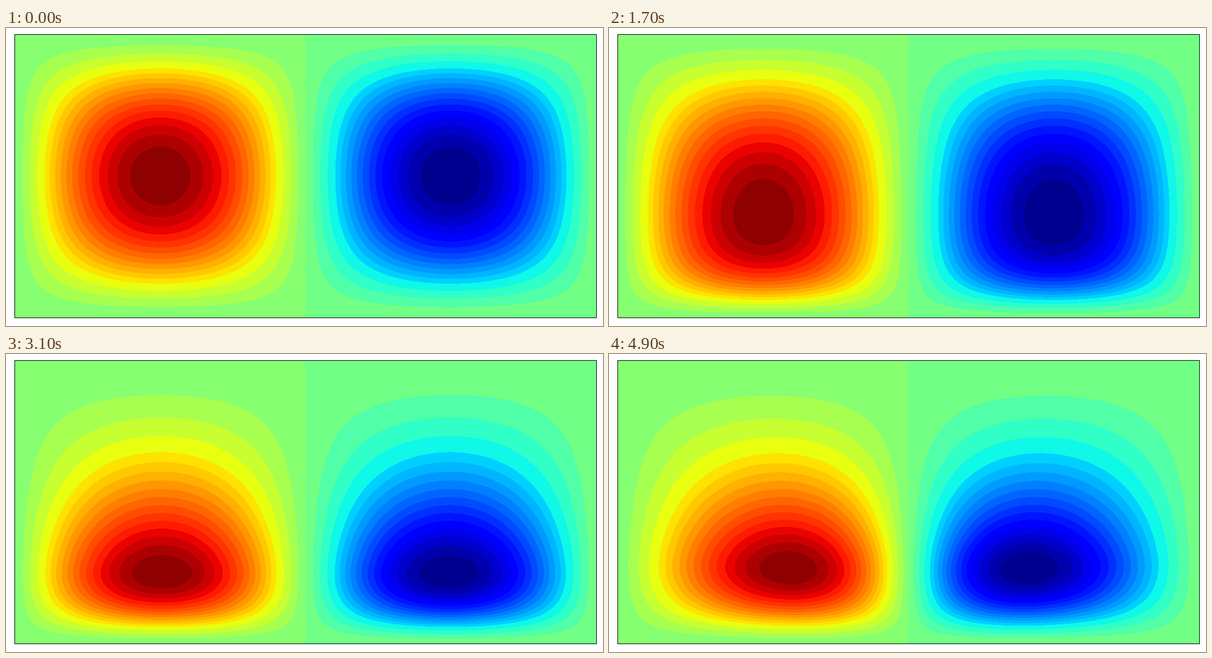
An HTML page with a canvas for the animation above (5 s loop, 1058x529 px).

```html
<!DOCTYPE html>
<html lang="en">
<head>
<meta charset="utf-8">
<title>Double gyre</title>
<style>
  html, body { margin: 0; width: 100%; height: 100%; overflow: hidden; background: #fff; }
  canvas { display: block; }
</style>
</head>
<body>
<canvas id="stage" width="1058" height="529"></canvas>
<script>
const ctx = document.getElementById('stage').getContext('2d');
const LEFT = 16, TOP = 12, WIDTH = 1030, HEIGHT = 502;
const CELL = WIDTH / 2, HALF = CELL / 2;
const CEILING = TOP - .5, FLOOR = TOP + HEIGHT + .5;
const STEP = 100, STEPS = 50;
const BANDS = 19, TABLE = 2000;

const ramp = (x, from, to) => Math.min(1, Math.max(0, (x - from) / (to - from)));

function ease(x, from, to) {
  const u = ramp(x, from, to);
  return u * u * (3 - 2 * u);
}

// Contour levels: the outer four bands are half again as wide as the rest
const levels = Array.from({ length: 17 }, (_, k) => (k < 4 ? 1.5 * k : k + 2) / BANDS);

function jet(u) {
  return [
    ramp(u, .35, .66) - .5 * ramp(u, .89, 1),
    ramp(u, .125, .375) - ramp(u, .64, .91),
    .5 + .5 * ramp(u, 0, .11) - ramp(u, .34, .65)
  ].map(c => Math.round(255 * c));
}

function bandColor(value, sign) {
  const level = levels.findLast(edge => edge <= value);
  return jet(.5 + sign * (level + .5 / BANDS) / 2);
}

function colorTable(sign) {
  return Uint32Array.from({ length: TABLE + 1 }, (_, i) => {
    const [r, g, b] = bandColor(i / TABLE, sign);
    return (255 << 24 | b << 16 | g << 8 | r) >>> 0;
  });
}
const warm = colorTable(1), cold = colorTable(-1);

// Phase from the peak (0) to a wall (1); skew crowds the contours at the peak
function phase(s, skew) {
  const r = s + .45 * s ** 4 * (1 - s);
  return r * (1 + skew) / (1 + skew * r);
}

const wave = p => Math.cos(p * Math.PI / 2);

const image = ctx.createImageData(WIDTH, HEIGHT);
const pixels = new Uint32Array(image.data.buffer);

function drawField(step) {
  const drift = .178 * Math.exp(.151 * (step - STEPS + 1));
  const peak = 262.5 + 128 * ease(step, 7, 26) - 55 * drift;
  const skewAbove = 1.9 * ease(step, 15, 35);
  const skewBelow = -.38 * Math.exp(-(((step - 17) / 4) ** 2));

  for (let row = 0; row < HEIGHT; row++) {
    const y = TOP + row + .5;
    const strength = TABLE * wave(y < peak
      ? phase((peak - y) / (peak - CEILING), skewAbove)
      : phase((y - peak) / (FLOOR - peak), skewBelow));
    const centre = drift * (y + 70) / 450;
    const start = row * WIDTH;
    for (let col = 0; col < CELL; col++) {
      const x = (col + .5) / HALF - 1;
      const value = strength * wave((x - centre) / (1 - centre * x)) | 0;
      pixels[start + col] = warm[value];
      pixels[start + WIDTH - 1 - col] = cold[value];
    }
  }
  ctx.putImageData(image, LEFT, TOP);
}

function draw(step) {
  ctx.fillStyle = '#fff';
  ctx.fillRect(0, 0, 1058, 529);
  drawField(step);

  // Rounded corners of the warm cell
  ctx.beginPath();
  ctx.rect(LEFT, TOP, CELL, HEIGHT);
  ctx.roundRect(LEFT, TOP, CELL, HEIGHT, 8);
  ctx.fillStyle = `rgb(${bandColor(0, -1)})`;
  ctx.fill('evenodd');

  ctx.strokeStyle = '#000';
  ctx.strokeRect(LEFT - .5, TOP - .5, WIDTH + 1, HEIGHT + 1);
}

const began = performance.now();
let shown = -1;
function tick() {
  const step = Math.floor((performance.now() - began) / STEP) % STEPS;
  if (step !== shown) draw(shown = step);
  requestAnimationFrame(tick);
}
tick();
</script>
</body>
</html>
```
